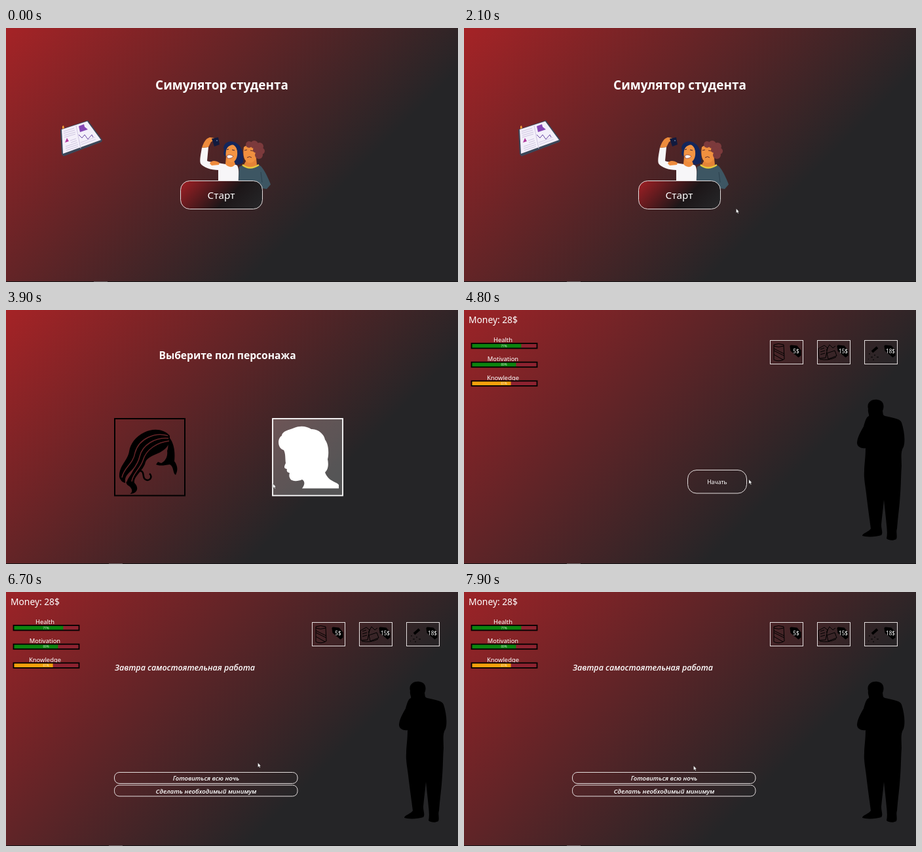
An HTML page that plays this animation: 690 px wide and 388 px high, repeating every 8 s.

```html
<!DOCTYPE html>
<html lang="ru">
<head>
<meta charset="utf-8">
<style>
html, body { margin: 0; height: 100%; overflow: hidden; background: #252527; }
svg { display: block; width: 100vw; height: 100vh; }
text { font-family: "Noto Sans", "Open Sans", sans-serif; fill: #fff; text-anchor: middle; }
.title { font-weight: 700; }
.hand { font-family: "Open Sans", "Noto Sans", sans-serif; font-style: italic; font-weight: 600; }
.line { fill: none; stroke: #e4dede; stroke-width: 1; }
.ink { fill: none; stroke: #000; stroke-width: 1; }
</style>
</head>
<body>
<svg viewBox="0 0 690 388" preserveAspectRatio="none">
  <defs>
    <linearGradient id="bg" gradientUnits="userSpaceOnUse" x1="0" y1="0" x2="539" y2="539">
      <stop id="warm" stop-color="#a52326"/><stop offset=".7" stop-color="#252527"/>
    </linearGradient>
    <linearGradient id="btn" gradientUnits="userSpaceOnUse" x1="272" y1="230" x2="350" y2="308">
      <stop stop-color="#a01f24"/><stop offset=".62" stop-color="#1c1618"/><stop offset="1" stop-color="#252527"/>
    </linearGradient>
  </defs>
  <rect width="690" height="388" fill="url(#bg)"/>

  <g id="start">
    <text class="title" x="329.5" y="94" font-size="18.9">Симулятор студента</text>
    <!-- tablet -->
    <path d="M83 155L125 141L147 171L146 174L88 196L85 193Z" fill="#3b4658"/>
    <path d="M85 155L124 142.5L145 171L87 192Z" fill="#f3effa"/>
    <path d="M86 150l2 -1 1 4 -3 1z" fill="#f2a03a"/>
    <path d="M107 149L114 184" stroke="#cfc6e2"/>
    <path d="M88 158l16 -5M88 161l17 -5M89 164l17 -5M89 167l17 -5M98 172l9 -3M99 175l9 -3M91 181l18 -6M91 184l19 -6M92 187l18 -6" stroke="#c4bbd8" stroke-width=".8"/>
    <path d="M90 175l3 -7 3 5z" fill="#b0399c"/>
    <path d="M111 150l8 -3 1 4 5 4 -12 4z" fill="#8547b5"/>
    <path d="M111 163l5 5 4 -5 5 7 6 -7 2 4" fill="none" stroke="#6a4aa5"/>
    <path d="M114 175l22 -8M115 178l22 -8" stroke="#cfc6e2" stroke-width=".8"/>
    <!-- two friends -->
    <path d="M356 212C365 207 381 206 389 211C394 216 400 228 404 239L398 246L386 244L354 242Z" fill="#3d5663"/>
    <path d="M389 220L391 236" stroke="#2c414d"/>
    <path d="M332 184C332 174 344 170 352 176C361 181 363 195 362 205C357 211 346 209 342 204Z" fill="#13265c"/>
    <path d="M299 183L309 182L307 203C314 206 322 205 329 207C337 209 348 207 353 210C357 217 354 226 355 242H324V217C313 217 301 213 297 207C295 202 298 190 299 183Z" fill="#f7f6f8"/>
    <path d="M299 183C302 174 305 169 311 167L318 168L319 171L313 174L309 182Z" fill="#ee8b3c"/>
    <path d="M314 169L324 167L326 178L318 181Z" fill="#111a3e"/>
    <circle cx="322" cy="172" r="1" fill="#65749e"/>
    <path d="M336 197L347 200L350 208C346 214 339 213 335 208Z" fill="#ee8b3c"/>
    <path d="M335 183C337 176 348 176 352 183C355 194 352 204 345 205C338 205 334 197 335 183Z" fill="#f39443"/>
    <path d="M333 187C333 178 341 175 347 178C343 179 338 180 336 187L335 196C331 194 332 190 333 187Z" fill="#13265c"/>
    <path d="M347 178C353 182 354 190 355 199C361 196 361 185 355 179Z" fill="#13265c"/>
    <path d="M337 195Q342 192 347 196Q344 200 338 199Z" fill="#fff" stroke="#7a2a28" stroke-width=".7"/>
    <path d="M337 186l3 -1M345 186l4 1" stroke="#352034"/>
    <path d="M311 207C314 201 321 203 326 206L325 209L314 210Z" fill="#ee8b3c"/>
    <path d="M369 198L382 199L383 209C376 216 367 213 363 209Z" fill="#e48337"/>
    <path d="M361 209Q372 218 386 209" fill="none" stroke="#e6c83e" stroke-width="2.5"/>
    <path d="M363 182C368 177 382 179 384 188C384 199 378 207 371 206C363 204 361 194 363 182Z" fill="#f0903f"/>
    <g fill="#7c3a3c">
      <circle cx="371" cy="178" r="5"/><circle cx="379" cy="178" r="6"/><circle cx="387" cy="181" r="6"/>
      <circle cx="390" cy="188" r="5"/><circle cx="386" cy="194" r="6"/><circle cx="382" cy="186" r="5"/>
    </g>
    <path d="M364 187l4 -1M373 187l5 1M368 198q4 -3 7 0" fill="none" stroke="#5a2a2c"/>
    <rect class="line" x="266.5" y="233.5" width="125" height="43" rx="14" style="fill:url(#btn)"/>
    <text x="328.5" y="261" font-size="15.2">Старт</text>
  </g>

  <g id="choose">
    <text class="title" x="338" y="75" font-size="15.6">Выберите пол персонажа</text>
    <rect x="166" y="166" width="107" height="117.5" class="ink" style="stroke-width:2"/>
    <path d="M250 192C240 180 222 181 211 187C198 193 190 204 188 216C186 230 172 238 173 255C175 262 180 264 182 264C180 252 190 248 196 240C192 256 176 262 188 269C194 274 193 279 189 281C200 281 204 272 196 264C194 254 210 246 213 232C220 218 244 222 250 200Z"/>
    <path d="M248 193C258 204 258 220 257 231C263 239 262 246 259 252C254 249 257 240 250 236C242 237 236 239 229 236L232 232L237 234C245 230 247 222 246 215C249 208 246 202 248 193Z"/>
    <path class="ink" d="M205 246C213 246 206 259 216 260C222 259 223 253 219 250" style="stroke-width:2.5"/>
    <g fill="none" stroke="#642326" stroke-width="1.5">
      <path d="M247 192C228 186 203 196 197 218C194 236 180 240 177 256"/>
      <path d="M248 196C228 194 208 206 204 224C201 240 186 250 184 262"/>
      <path d="M249 200C232 202 214 212 209 230C204 244 193 250 192 262"/>
    </g>
    <rect id="hover" x="407" y="166" width="107" height="117.5" fill="#fff" fill-opacity=".22"/>
    <rect class="line" x="407" y="166" width="107" height="117.5" style="stroke:#fff;stroke-width:1.8"/>
    <path fill="#fff" d="M424 214C414 211 414 196 421 192C422 184 434 183 440 180C450 176 460 178 466 182C476 181 486 190 487 198C493 206 493 220 491 228C493 238 491 245 487 248C492 262 504 262 508 267V272.5H452C457 266 456 261 452 259C446 262 436 262 434 258C432 255 432 252 433 249C429 248 428 246 429 243C424 242 424 240 427 234C426 226 427 220 424 214Z"/>
  </g>

  <g id="game">
    <text x="7" y="20" font-size="13.8" style="text-anchor:start">Money: 28$</text>
    <g id="bars"></g>
    <g id="shop"></g>
    <g class="ink">
      <path d="M473 53Q480 50 488 53L489 75Q481 80 473 76ZM473 55Q480 58 488 55M473 59L489 67M473 62L489 70M473 68L487 76"/>
      <path d="M541 59L550 54L555 58L552 73L542 74ZM544 60L550 58M544 64L551 62M544 68L551 66M553 62L558 53L563 58L567 55M554 66L566 62L569 70L556 75ZM543 75Q556 78 568 72"/>
      <path d="M623 64L631 57" stroke-width="4"/>
      <path d="M618 67h2M621 72h3M626 69h2M630 72h3M617 75h1M624 76h2"/>
    </g>
    <path d="M617 151C614 140 624 136 631 137C641 138 642 147 639 154C640 159 639 161 643 162C656 165 666 166 668 172C672 184 674 200 671 209C666 216 668 228 668 238C667 252 667 268 666 280C665 300 662 318 661 334C659 340 662 344 660 350C655 353 648 352 645 349C647 340 645 330 644 318L641 290C640 303 638 315 637 328C637 336 640 340 637 344C628 347 614 347 608 345C608 341 618 339 621 334C619 318 616 298 614 280C613 270 610 258 611 246C611 236 613 226 613 211C607 212 600 209 600 203C600 195 606 185 610 178C612 171 614 163 618 162C619 160 616 156 617 151Z"/>
    <g id="begin">
      <rect class="line" x="341.5" y="244.5" width="90" height="35.5" rx="13.5"/>
      <text x="386.5" y="266" font-size="8.6">Начать</text>
    </g>
    <g id="question">
      <text class="hand" x="273" y="120" font-size="12.5">Завтра самостоятельная работа</text>
      <rect class="line" x="165.5" y="275.5" width="279.5" height="17" rx="7.5"/>
      <text class="hand" x="305.5" y="288" font-size="9.5">Готовиться всю ночь</text>
      <rect class="line" x="165.5" y="295" width="279.5" height="17" rx="7.5"/>
      <text class="hand" x="305.5" y="307.5" font-size="9.7">Сделать необходимый минимум</text>
    </g>
  </g>

  <rect y="387" width="690" height="1" fill="#171517"/>
  <rect id="tab" y="387" width="21" height="1" fill="#5c5a5c"/>
  <path id="cursor" d="M0 0V6.5L1.5 5.2L2.7 7.6L3.7 7.1L2.6 4.8H4.5Z" fill="#fff" stroke="#222" stroke-width=".3"/>
</svg>
<script>
const $ = id => document.getElementById(id);

$("bars").innerHTML = [["Health", 77, "#0c840f"], ["Motivation", 69, "#0c840f"], ["Knowledge", 61, "#f6a10c"]]
  .map(([name, value, color], i) => `<g transform="translate(0 ${i * 28.7})">
    <text x="59.5" y="49.3" font-size="9.4">${name}</text>
    <rect x="11.5" y="51" width="100" height="7.5" fill="#8d2230"/>
    <rect x="11.5" y="51" width="${value * .985}" height="7.5" fill="${color}"/>
    <rect x="11.5" y="51" width="100" height="7.5" class="ink" style="stroke-width:1.8"/>
    <text x="61" y="56.5" font-size="4.6" opacity=".8">${value}%</text></g>`).join("");

$("shop").innerHTML = [5, 15, 18].map((price, i) => `<g transform="translate(${467.5 + i * 72} 46.5)">
    <rect class="line" width="50" height="36"/>
    <path d="M30 9Q30 7 32 7L41 8L47 15V23L43 26L31 16Z"/>
    <text x="39.5" y="19" font-size="8.2">${price}$</text></g>`).join("");

// pointer stops: time, x, y
const stops = [[1150, 470, 389], [1650, 424, 280], [2000, 415.5, 276], [2350, 415.5, 276],
  [2600, 367.5, 267.5], [3150, 367.5, 267.5], [3450, 396, 267], [3650, 396, 267],
  [3850, 407.5, 265.5], [4250, 412, 265], [4500, 412, 265], [5200, 470, 250], [5900, 450, 256],
  [6350, 388, 261], [6600, 386, 261], [7100, 372, 261], [7900, 350.5, 265.5], [8000, 350, 266]];

function pointer(t) {
  const i = stops.findIndex(s => s[0] > t);
  if (i < 1) return stops[0].slice(1);
  const [a, b] = [stops[i - 1], stops[i]];
  const u = (t - a[0]) / (b[0] - a[0]), k = u * u * (3 - 2 * u);
  return [1, 2].map(n => a[n] + (b[n] - a[n]) * k);
}

const show = (id, on) => $(id).style.display = on ? "" : "none";

function draw(now) {
  const t = now % 8000, [x, y] = pointer(t), playing = t >= 4500;
  show("start", t < 2600);
  show("choose", t >= 2600 && !playing);
  show("game", playing);
  show("begin", t < 6500);
  show("question", t >= 6500);
  show("hover", x > 406);
  show("cursor", t > 1150);
  $("cursor").setAttribute("transform", `translate(${x} ${y})`);
  $("tab").setAttribute("x", t < 1150 ? 134 : 157);
  $("warm").setAttribute("stop-color", playing ? "#9c2327" : "#a52326");
  requestAnimationFrame(draw);
}
draw(0);
</script>
</body>
</html>
```
